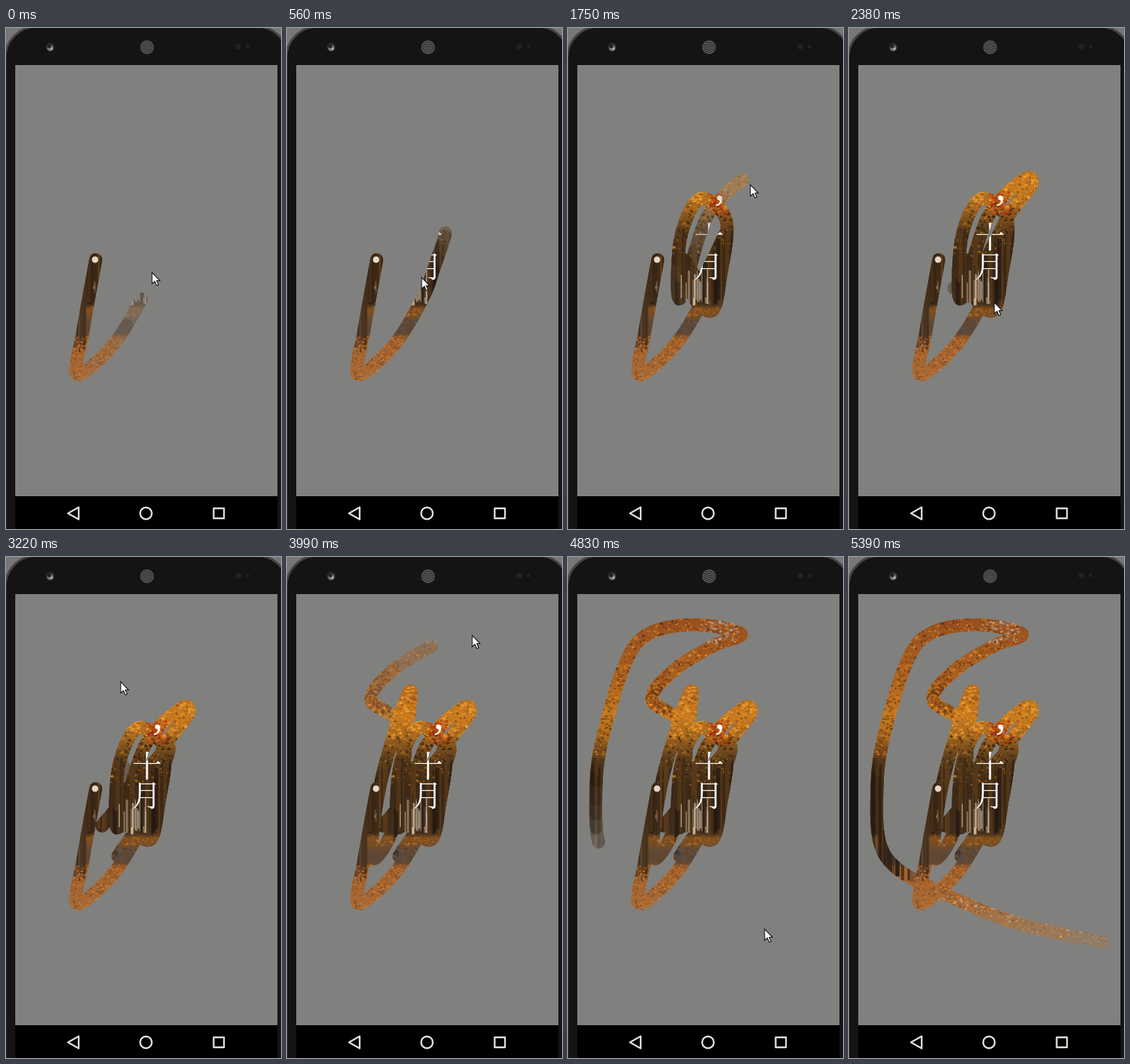
Recreate the animation shown at these times as an HTML page with a canvas. Size 386 px wide and 703 px high, loop 5950 ms.

```html
<!DOCTYPE html>
<html lang="zh">
<head>
<meta charset="utf-8">
<style>
html, body { margin: 0; width: 100%; height: 100%; overflow: hidden; background: #141414; }
canvas { display: block; }
</style>
</head>
<body>
<canvas id="stage" width="386" height="703"></canvas>
<script>
const W = 386, H = 703, LOOP = 5950, STEP = 70, LAST = 5390;
const FADE_STEPS = 4, FADE_ALPHA = 0.45, POINTER_LEAD = 100;
const SCREEN = { x: 13, y: 52, w: 368, h: 605 };

let seed = 71;
function rnd() {
  seed = (seed * 1664525 + 1013904223) >>> 0;
  return seed / 4294967296;
}
const range = (a, b) => a + rnd() * (b - a);
const pick = list => list[Math.floor(rnd() * list.length)];
const mix = (a, b, u) => a + (b - a) * u;

function layer() {
  const c = document.createElement('canvas');
  c.width = W;
  c.height = H;
  return c.getContext('2d');
}

function dot(g, x, y, r, color) {
  g.fillStyle = color;
  g.beginPath();
  g.arc(x, y, r, 0, Math.PI * 2);
  g.fill();
}

// Finger track: each call spreads its points evenly up to the given time
const knots = [];
let reached = -630;
function swipe(to, ...xy) {
  for (let i = 0; i < xy.length; i += 2) {
    knots.push({ x: xy[i], y: xy[i + 1], t: mix(reached, to, (i + 2) / xy.length) });
  }
  reached = to;
}
swipe(0, 126, 325, 108, 425, 100, 486, 150, 445, 190, 380);
swipe(560, 206, 338, 222, 287);
swipe(1120, 187, 352, 164, 326, 178, 380, 203, 396, 214, 350);
swipe(1540, 222, 270, 185, 240, 158, 295, 157, 380);
swipe(1960, 195, 265, 245, 213, 256, 220, 225, 262);
swipe(2380, 190, 330, 168, 376, 147, 365);
swipe(2940, 137, 375, 190, 310, 229, 268, 195, 360, 157, 420);
swipe(3220, 195, 370, 166, 295);
swipe(3780, 173, 188, 133, 310, 119, 422, 152, 370, 160, 242);
swipe(3990, 118, 200, 150, 158, 203, 125);
swipe(4410, 243, 108, 180, 95, 115, 107, 80, 150, 46, 265);
swipe(4830, 39, 340, 43, 400);
swipe(5390, 65, 435, 115, 464, 230, 512, 356, 540);

function spline(a, b, c, d, u) {
  return 0.5 * (2 * b + (c - a) * u + (2 * a - 5 * b + 4 * c - d) * u * u
    + (3 * b - a - 3 * c + d) * u * u * u);
}

function buildTrack() {
  const at = i => knots[Math.max(0, Math.min(knots.length - 1, i))];
  const points = [];
  for (let i = 0; i < knots.length - 1; i++) {
    const [a, b, c, d] = [at(i - 1), at(i), at(i + 1), at(i + 2)];
    for (let k = 0; k < 16; k++) {
      const u = k / 16;
      points.push({ x: spline(a.x, b.x, c.x, d.x, u), y: spline(a.y, b.y, c.y, d.y, u), t: mix(b.t, c.t, u) });
    }
  }
  points.push(at(knots.length));
  return points;
}

function leaves(g, n, x0, y0, x1, y1, size, colors) {
  for (let i = 0; i < n; i++) {
    g.fillStyle = pick(colors);
    g.globalAlpha = range(0.35, 0.9);
    g.beginPath();
    g.ellipse(range(x0, x1), range(y0, y1), range(0.6, size), range(0.5, size * 0.65), range(-0.6, 0.6), 0, 7);
    g.fill();
  }
  g.globalAlpha = 1;
}

function trunks(g, n, x0, y0, x1, y1, width, colors) {
  for (let i = 0; i < n; i++) {
    g.fillStyle = pick(colors);
    g.globalAlpha = range(0.5, 0.95);
    const x = range(x0, x1), top = range(y0, y0 + 20);
    g.fillRect(x, top, range(1, width), range(y1 - 12, y1) - top);
  }
  g.globalAlpha = 1;
}

function buildForest() {
  const g = layer();
  const base = g.createLinearGradient(0, 0, 0, H);
  const shade = (y, color) => base.addColorStop(y / H, color);
  shade(90, '#985020');
  shade(175, '#ad6420');
  shade(225, '#c67c20');
  shade(252, '#a06420');
  shade(285, '#56391a');
  shade(325, '#3c2815');
  shade(388, '#44301d');
  shade(395, '#82501f');
  shade(416, '#5c4736');
  shade(429, '#624630');
  shade(437, '#a1602c');
  shade(540, '#a97848');
  g.fillStyle = base;
  g.fillRect(SCREEN.x, SCREEN.y, SCREEN.w, SCREEN.h);

  // Canopy
  leaves(g, 2600, 13, 52, 381, 165, 3, ['#d98222', '#b5651d', '#6a3518', '#8d4319', '#e49a3c', '#4c2b17']);
  leaves(g, 170, 185, 88, 240, 122, 3, ['#c3ab94', '#a88f7c', '#8c4a1c']);
  leaves(g, 2000, 110, 175, 381, 255, 3.2, ['#ed9a27', '#d97f1b', '#c8721d', '#f3a83a', '#7a4717']);
  leaves(g, 600, 95, 155, 145, 222, 3, ['#7a3b18', '#9a4c1c', '#c06f22', '#54301a']);
  leaves(g, 1000, 13, 155, 110, 280, 3, ['#d8801e', '#b96a1e', '#5e3517', '#7c4318']);
  leaves(g, 130, 198, 228, 228, 262, 3, ['#ba3110', '#8e2a10', '#d05b18']);
  leaves(g, 900, 110, 250, 381, 322, 3, ['#c27c1c', '#94601c', '#2f2111', '#40290f', '#271b10']);

  // Trunks and the light between them
  trunks(g, 90, 13, 280, 381, 392, 7, ['#2a1c11', '#3b2817', '#553819', '#6a4720']);
  trunks(g, 36, 13, 290, 110, 458, 7, ['#352417', '#5d4733', '#49311c', '#241a12']);
  trunks(g, 16, 158, 338, 196, 390, 4, ['#b9a58c', '#d2c2aa', '#8f7d68']);
  trunks(g, 9, 160, 318, 222, 390, 5, ['#251910', '#2e2015']);
  trunks(g, 3, 121, 343, 125, 374, 3, ['#bda78b', '#80664b']);
  trunks(g, 2, 148, 345, 152, 426, 6, ['#261a11']);
  dot(g, 125, 325, 4.5, '#e3d8c8');

  // Ground
  leaves(g, 240, 120, 391, 381, 405, 3, ['#a6621e', '#774619', '#bd7627']);
  leaves(g, 70, 148, 405, 190, 426, 4, ['#4e4b4f', '#6d5741', '#55402f']);
  leaves(g, 2500, 88, 432, 381, 500, 2.3, ['#c5752f', '#95501f', '#d68c40', '#764320', '#b15d20']);
  leaves(g, 3800, 125, 475, 381, 657, 2.3, ['#d49b61', '#ad6a2e', '#e0bd91', '#7e4c26', '#bf8141']);

  g.fillStyle = '#fff';
  g.textAlign = 'center';
  g.font = '52px "Noto Serif", serif';
  g.fillText(',', 213, 242);
  g.font = '42px "Noto Serif CJK SC", "Noto Sans CJK SC", "Noto Sans CJK", serif';
  g.fillText('十', 198, 309);
  g.fillText('月', 197, 350);
  return g.canvas;
}

function buildPhone() {
  const g = layer();
  g.fillStyle = '#777';
  g.fillRect(0, 0, W, H);
  g.beginPath();
  g.roundRect(-1, -2, 397, 800, 44);
  g.fillStyle = '#141414';
  g.fill();
  g.strokeStyle = '#444';
  g.lineWidth = 3;
  g.stroke();

  dot(g, 62, 27, 6, '#303030');
  dot(g, 62, 28, 4.3, '#777');
  dot(g, 60.5, 25.5, 2.8, '#222');
  dot(g, 64, 29, 1.5, '#b8b8b8');
  dot(g, 198, 27, 10, '#303030');
  for (let ring = 0; ring < 4; ring++) {
    const count = ring ? ring * 7 : 1;
    for (let i = 0; i < count; i++) {
      const a = i / count * Math.PI * 2;
      dot(g, 198 + Math.cos(a) * ring * 2.8, 27 + Math.sin(a) * ring * 2.8, 0.85, '#777');
    }
  }
  dot(g, 326, 26, 4, '#222');
  dot(g, 339, 26, 2.5, '#222');

  g.fillStyle = '#80807e';
  g.fillRect(SCREEN.x, SCREEN.y, SCREEN.w, SCREEN.h);
  g.fillStyle = '#000';
  g.fillRect(13, 657, 368, 46);

  g.strokeStyle = '#e2e2dc';
  g.lineWidth = 2.4;
  g.lineJoin = 'round';
  g.stroke(new Path2D('M87 681L102 672.5V689.5Z'));
  g.beginPath();
  g.arc(196.5, 681, 8.2, 0, Math.PI * 2);
  g.stroke();
  g.strokeRect(291.5, 674, 14.5, 14);
  return g.canvas;
}

const stage = document.getElementById('stage').getContext('2d');
const reveal = layer();
const track = buildTrack();
const forest = buildForest();
const phone = buildPhone();
const arrow = new Path2D('M0 0V16L3.8 12.5L6.5 18.5L9 17.5L6.5 11.5H11Z');

const headAt = t => track.find(p => p.t >= t) || track[track.length - 1];

function strokeUntil(t, alpha) {
  reveal.globalAlpha = alpha;
  reveal.beginPath();
  for (const p of track) {
    if (p.t > t + 0.01) break;
    reveal.lineTo(p.x, p.y);
  }
  reveal.stroke();
}

function drawReveal(t) {
  reveal.globalCompositeOperation = 'source-over';
  reveal.clearRect(0, 0, W, H);
  reveal.lineWidth = 18;
  reveal.lineCap = reveal.lineJoin = 'round';
  // Stacked passes make the newest stretch the faintest
  for (let k = 0; k < FADE_STEPS; k++) strokeUntil(t - k * STEP, FADE_ALPHA);
  strokeUntil(t - FADE_STEPS * STEP, 1);
  reveal.globalAlpha = 1;
  reveal.globalCompositeOperation = 'source-in';
  reveal.drawImage(forest, 0, 0);
  stage.drawImage(reveal.canvas, 0, 0);
}

// Moments when the pointer strays from the track: time, x, y
const strays = [[0, 205, 343], [1120, 232, 289], [2380, 204, 385], [3220, 161, 175], [3990, 260, 110]];
// Final dash off the corner
const exit = [[4620, 48, 420], [4830, 276, 522], [5040, 366, 545], [5250, 374, 690], [5320, 386, 703]];

function pointerAt(t) {
  if (t >= exit[0][0]) {
    const i = exit.findIndex(key => key[0] > t);
    if (i < 0) return null;
    const [t0, x0, y0] = exit[i - 1], [t1, x1, y1] = exit[i];
    const u = (t - t0) / (t1 - t0);
    return { x: mix(x0, x1, u), y: mix(y0, y1, u) };
  }
  let { x, y } = headAt(t + POINTER_LEAD);
  for (const [time, sx, sy] of strays) {
    const pull = Math.max(0, 1 - Math.abs(t - time) / 210);
    x = mix(x, sx, pull);
    y = mix(y, sy, pull);
  }
  return { x, y };
}

function drawPointer(t) {
  const p = pointerAt(t);
  if (!p) return;
  stage.save();
  stage.translate(Math.round(p.x), Math.round(p.y));
  stage.fillStyle = '#fff';
  stage.strokeStyle = '#111';
  stage.lineWidth = 1.1;
  stage.fill(arrow);
  stage.stroke(arrow);
  stage.restore();
}

const start = performance.now();
function frame() {
  const elapsed = (performance.now() - start) % LOOP;
  const t = Math.min(LAST, Math.floor(elapsed / STEP) * STEP);
  stage.drawImage(phone, 0, 0);
  drawReveal(t);
  drawPointer(t);
  requestAnimationFrame(frame);
}
frame();
</script>
</body>
</html>
```
